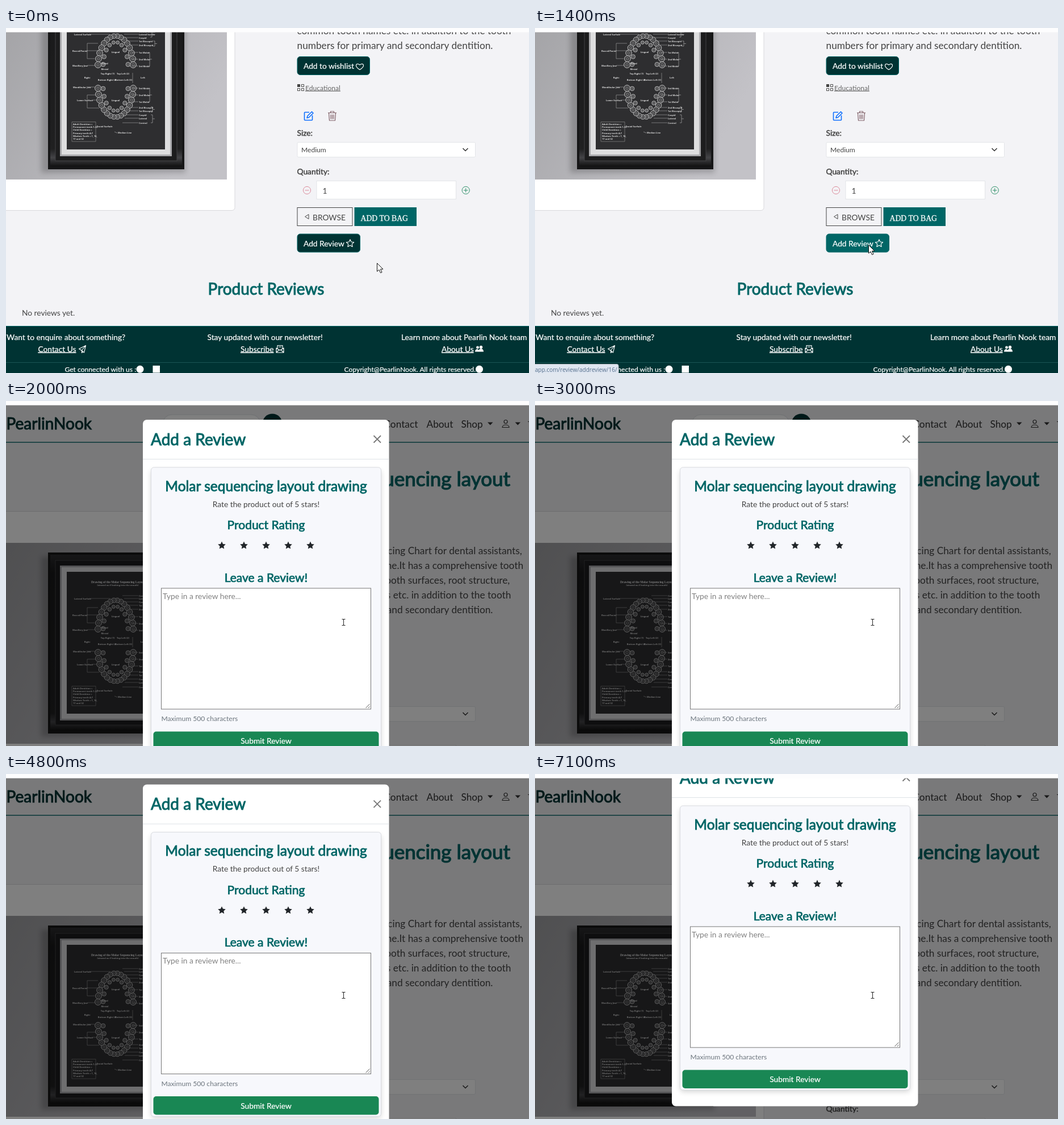
Recreate the animation shown at these times as an HTML page. Size 921 by 608 pixels, loop 7200 ms.

```html
<!DOCTYPE html>
<html lang="en">
<head>
<meta charset="utf-8">
<title>Add a review</title>
<style>
html, body { margin: 0; width: 100%; height: 100%; overflow: hidden; background: #f3f3f6; }
svg { display: block; width: 921px; height: 608px; font-family: Lato, sans-serif; }
text { white-space: pre; }
.tiny { font: bold 4px "Open Sans", sans-serif; fill: #ddd; }
</style>
</head>
<body>
<svg id="stage" viewBox="0 0 921 608"></svg>
<script>
const TEAL = '#006666', DARK = '#003333', INK = '#444', GREEN = '#198754';
const BRAND = 'PearlinNook', PRODUCT = ['Molar sequencing layout', 'drawing'];
const BASE = 13.75, SMALL = 12.1, LARGE = 17.25;
const PAGE_SCROLL = 337, LOOP = 7200, STEP = 100;

// Drawing helpers; each returns SVG markup.
const text = (x, y, size, fill, str, { heavy = 0, anchor = 'start', more = '' } = {}) =>
  `<text x="${x}" y="${y}" font-size="${size}" fill="${fill}" text-anchor="${anchor}"` +
  (heavy ? ` stroke="${fill}" stroke-width="${size * heavy}"` : '') + ` ${more}>${str}</text>`;
const rect = (x, y, w, h, fill, more = '') =>
  `<rect x="${x}" y="${y}" width="${w}" height="${h}" fill="${fill}" ${more}/>`;
const circle = (x, y, r, fill, more = '') => `<circle cx="${x}" cy="${y}" r="${r}" fill="${fill}" ${more}/>`;
const line = (d, stroke, width = 1, fill = 'none') =>
  `<path d="${d}" fill="${fill}" stroke="${stroke}" stroke-width="${width}" stroke-linejoin="round"/>`;
const MID = { anchor: 'middle' }, BOLD = { heavy: .035 }, MEDIUM = { heavy: .018 };
const LINK = { heavy: .018, more: 'text-decoration="underline"' };
const title = (y, size, str) => text(458, y, size, TEAL, str, { ...MID, ...BOLD });

function star(x, y, r) {
  const points = Array.from({ length: 10 }, (_, i) => {
    const a = i * Math.PI / 5 - Math.PI / 2, q = i % 2 ? r * .48 : r;
    return `${(x + q * Math.cos(a)).toFixed(1)} ${(y + q * Math.sin(a)).toFixed(1)}`;
  });
  return `M${points.join('L')}Z`;
}

function arch(cy, dir) {
  let out = '';
  for (const [n, rx, ry, size] of [[16, 31, 53, 5.4], [10, 22, 42, 3.7]])
    for (let i = 0; i < n; i++) {
      const a = Math.PI * (i + .2) / (n - .6), side = Math.abs(Math.cos(a));
      const x = 193 + rx * Math.cos(a), y = cy + dir * ry * Math.sin(a), r = size * (.72 + .3 * side);
      out += circle(x, y, r, '#444446', 'stroke="#d0d0d0" stroke-width=".9"') +
        circle(x, y, r * .4, 'none', 'stroke="#aaa" stroke-width=".5"');
    }
  return out;
}

function poster() {
  const label = (x, y, str, anchor = 'start') =>
    `<text class="tiny" x="${x}" y="${y}" text-anchor="${anchor}">${str}</text>`;
  let out = rect(107, 301, 173, 250, '#2e2e30') +
    `<text x="197" y="321" text-anchor="middle" font-family="Liberation Serif, serif" font-weight="bold" font-size="5.3" fill="#eee">Drawing of the Molar Sequencing Layout</text>` +
    label(197, 326, '(viewed as if looking into the mouth)', 'middle') + arch(404, -1) + arch(441, 1);
  const rightRows = [343, 348, 354, 360, 367, 380, 392, 404, 443, 455, 467, 477, 483, 490, 496, 504];
  const names = ['Central Incisor', 'Lateral Incisor', 'Cuspid', '1st Bicuspid', '2nd Bicuspid',
    '1st Molar', '2nd Molar', '3rd Molar', '3rd Molar', '2nd Molar', '1st Molar',
    '2nd Bicuspid', '1st Bicuspid', 'Cuspid', 'Lateral', 'Central'];
  rightRows.forEach((y, i) => {
    const reach = 222 - 17 * clamp((Math.abs(y - 423) - 50) / 30);
    out += line(`M${reach} ${y}H233`, '#aaa', .6) + label(234, y + 1.5, names[i]);
  });
  for (const [y, h, x] of [[343, 10, 257], [360, 9, 262], [380, 24, 253], [443, 24, 253], [476, 9, 258], [490, 14, 258]])
    out += line(`M${x - 3} ${y}h3v${h}h-3m3 ${-h / 2}h4`, '#bbb', .6);
  [[120, 348, 'Lateral Surface', 183], [117, 377, 'Buccal/Facial', 165], [117, 403, 'Maxillary Jaw', 156],
   [118, 441, 'Mandibular Jaw', 156], [125, 464, 'Lower Surface', 160], [160, 510, 'Facial Surface', 184]]
    .forEach(([x, y, str, end]) => { out += label(x, y + 1.5, str) + line(`M${x + 26} ${y}H${end}`, '#aaa', .6); });
  out += line('M143 364V391M143 364H162M143 391H156M143 455V478M143 455H158M143 478H164M223 416V434', '#aaa', .6);
  out += label(193, 381, 'Lingual', 'middle') + label(193, 466, 'Lingual', 'middle') +
    label(174, 401, 'Distal', 'middle') + label(174, 411, 'Mesial', 'middle') +
    label(179, 419, 'Top Right (1)', 'middle') + label(206, 419, 'Top Left (2)', 'middle') +
    label(178, 430, 'Bottom Right (4)', 'middle') + label(207, 430, 'Bottom Left (3)', 'middle') +
    label(143, 426, 'Right', 'middle') + label(241, 426, 'Left', 'middle') + label(197, 523, 'Median Line');
  out += line('M116 502.5H158V537H116Z', '#888', .7) + line('M191 520l5 2', '#bbb', .6);
  ['Adult Dentition =', 'Permanent teeth 1-32', 'Child Dentition =', 'Primary teeth A-T', 'Wisdom Teeth = 1, 16,', '17 and 32']
    .forEach((str, i) => { out += label(118, 508 + i * 5.2, str); });
  return out;
}

function picture() {
  return rect(-9, 194.5, 412, 464, '#fff', 'rx="5" stroke="#d9d9dc"') +
    rect(0, 250, 389, 354, 'url(#wall)') +
    rect(62, 274, 254, 318, '#000', 'opacity=".2" filter="url(#soft)"') +
    rect(74, 267, 240, 319, '#161617') +
    rect(78, 271, 232, 310, 'url(#wood)') +
    rect(87, 281, 214, 290, '#1d1d1e', 'stroke="#434345"') +
    rect(95, 290, 197, 273, '#aaaaad') +
    rect(98, 293, 191, 267, '#dededf') + poster();
}

function header() {
  const caret = x => `<path d="M${x} 37.5h9.5l-4.75 5z" fill="#333"/>`;
  return rect(0, 72, 921, 1.4, TEAL) +
    text(151, 50, 28, DARK, BRAND, { heavy: .035, anchor: 'end' }) +
    rect(276, 24, 172, 32, '#fff', 'rx="16" stroke="#dee2e6"') +
    text(287, 45, BASE, '#7c838a', 'Search Products Here') +
    circle(469, 39.8, 17.4, DARK) + circle(467.8, 39, 5, 'none', 'stroke="#fff" stroke-width="1.5"') +
    line('M471.5 43l4.5 4.5', '#fff', 1.8) +
    [[605, 'Home'], [665.5, 'Contact'], [740.5, 'About'], [801.5, 'Shop']]
      .map(([x, str]) => text(x, 46.5, LARGE, '#333', str)).join('') +
    caret(848) + caret(896.5) +
    circle(880, 36.5, 3, 'none', 'stroke="#333" stroke-width="1.2"') +
    line('M874 46.5c0-6 12-6 12 0z', '#333', 1.2) + line('M919 36l3 1', '#333');
}

function details() {
  const white = '#fff';
  const button = (y, w, str, id = '') =>
    rect(513, y, w, 32, DARK, `rx="5" stroke="${TEAL}" ${id}`) + text(524, y + 21.5, BASE, white, str, MEDIUM);
  const desc = ['Dental Molar Sequencing Chart for dental assistants,',
    'students, and everyone.It has a comprehensive tooth',
    'chart that indicates tooth surfaces, root structure,',
    'common tooth names etc. in addition to the tooth',
    'numbers for primary and secondary dentition.'];
  return PRODUCT.map((str, i) => text(512.5, 149.5 + 42 * i, 35, TEAL, str, BOLD)).join('') +
    text(512.5, 235.5, 20.6, INK, '€18.29', BOLD) +
    desc.map((str, i) => text(512.5, 270 + 26 * i, LARGE, INK, str)).join('') +
    button(387.5, 127.5, 'Add to wishlist') +
    line('M623 410.5c-11-7-6-13 0-8.5c6-4.5 11 1.5 0 8.5z', white, 1.2) +
    line('M513.5 436.5h4v4h-4z', '#444', 1.1, '#444') +
    line('M520.5 436.5h4v4h-4zM513.5 443.5h4v4h-4zM520.5 443.5h4v4h-4z', '#555', 1.1) +
    text(527, 446.5, SMALL, '#666', 'Educational', { more: 'text-decoration="underline"' }) +
    line('M534 485.5H526.5Q525.5 485.5 525.5 486.5V498.5Q525.5 499.5 526.5 499.5H538.5Q539.5 499.5 539.5 498.5V491M530 495.5l1-3.5 7.5-7.5 2.5 2.5-7.5 7.5z', '#0d6efd', 1.6) +
    line('M567 486.5H582M571.5 486v-2h6v2M568.5 487l1 13h10l1-13M572 489.5v8M574.5 489.5v8M577 489.5v8', '#806068', 1.2) +
    text(512.5, 526.5, BASE, INK, 'Size:', BOLD) +
    rect(513, 538.5, 313.5, 26, white, 'rx="2" stroke="#e3e5e8"') +
    text(520, 555.5, SMALL, INK, 'Medium') + line('M804.5 549l4.5 4.5 4.5-4.5', '#333', 1.5) +
    text(512.5, 595, BASE, INK, 'Quantity:', BOLD) +
    circle(530, 623, 6.6, 'none', 'stroke="#dc8a9a"') + line('M526.5 623h7', '#dc8a9a') +
    rect(547, 606.5, 245.5, 32, white, 'stroke="#e3e5e8"') + text(557.5, 628.5, BASE, INK, '1') +
    circle(809.7, 623, 6.6, 'none', 'stroke="#2d9068"') + line('M806 623h7.4M809.7 619.3v7.4', '#2d9068') +
    rect(513, 653.5, 97, 32, '#f3f3f6', 'stroke="#444"') + line('M533 665.5v8l-6.5-4z', INK) +
    text(540, 675.5, BASE, INK, 'BROWSE') +
    rect(613.5, 653, 109.5, 33, TEAL) +
    text(624.5, 676.5, BASE, white, 'ADD TO BAG', { heavy: .02, more: 'font-family="Liberation Serif, serif"' }) +
    button(700, 110.5, 'Add Review', 'id="review"') + line(star(606, 716.7, 7), white, 1.1);
}

function footer() {
  const w = '#fff', row = (x, y, str, style = MEDIUM, size = BASE) => text(x, y, size, w, str, style);
  return title(807, 28, 'Product Reviews') + text(28, 844, BASE, INK, 'No reviews yet.') +
    rect(0, 862.5, 921, 90, DARK) + rect(0, 862, 921, 1, TEAL) + rect(0, 926, 921, 1, '#1b5555') +
    row(1, 887, 'Want to enquire about something?') +
    row(354.5, 887, 'Stay updated with our newsletter!') +
    row(696, 887, 'Learn more about Pearlin Nook team') +
    row(56.5, 907.5, 'Contact Us', LINK) + line('M128.5 902.5l12-6-3 12.5-4-3.5zM140 897l-6.5 8v4.5l2-2', w, 1.1) +
    row(413, 907.5, 'Subscribe', LINK) + line('M476 901l6.5 4 6.5-4v8h-13zM478 901.5v-5h9v5M480 899h5M476 909l5-5M489 909l-5-5', w, 1.2) +
    row(767, 907.5, 'About Us', LINK) +
    circle(830.5, 900, 2.4, w) + circle(836.5, 899.5, 2.7, w) +
    `<path d="M826 907.5c0-6 7-6 7 0zM832 907.5c0-7 9-7 9 0z" fill="${w}"/>` +
    row(103.5, 943, 'Get connected with us :', MEDIUM, SMALL) +
    circle(236, 938.3, 6.5, w) + rect(258.5, 932, 12.5, 12.5, w) +
    row(827, 943, `Copyright@${BRAND}. All rights reserved.`, { heavy: .018, anchor: 'end' }, SMALL) +
    circle(833.5, 938.3, 6.5, w);
}

function modal() {
  return rect(241, 33, 433.5, 613.5, '#fff', 'rx="7"') +
    text(255, 77.5, 28, TEAL, 'Add a Review', BOLD) +
    line('M647.5 61l12.5 12.5M660 61l-12.5 12.5', '#777', 1.8) +
    rect(241, 102, 433.5, 1, '#dee2e6') +
    rect(255.5, 122, 405, 499, '#000', 'rx="5" opacity=".17" filter="url(#soft)"') +
    rect(255.5, 117, 405, 501, '#f7f8fc', 'rx="5" stroke="#d9dbe0"') +
    title(158.5, 24.5, PRODUCT.join(' ')) +
    text(458, 186.5, BASE, INK, 'Rate the product out of 5 stars!', MID) +
    title(226, 21, 'Product Rating') +
    [380, 419, 458, 497, 536].map(x => `<path d="${star(x, 254.8, 7.2)}" fill="#212529"/>`).join('') +
    title(318.5, 21, 'Leave a Review!') +
    rect(273.5, 330, 369, 213, '#fff', 'stroke="#767676"') +
    text(276, 348.5, BASE, '#808080', 'Type in a review here...') +
    line('M633.5 541l7-7M638 541l2.5-2.5', '#555') +
    text(273.5, 564, SMALL, '#6c757d', 'Maximum 500 characters') +
    rect(259.5, 582.5, 397, 32.5, GREEN, 'rx="5"') +
    text(458, 604, BASE, '#fff', 'Submit Review', { ...MID, ...MEDIUM });
}

const clamp = v => Math.min(1, Math.max(0, v));
const smooth = u => u * u * (3 - 2 * u);

const stage = document.getElementById('stage');
stage.innerHTML = `<defs>
  <linearGradient id="wall" x2="1" y2=".5"><stop stop-color="#a1a1a4"/><stop offset="1" stop-color="#c3c2c7"/></linearGradient>
  <linearGradient id="wood" x2="0" y2="1"><stop stop-color="#2d2d2f"/><stop offset=".1" stop-color="#19191a"/><stop offset=".9" stop-color="#202021"/><stop offset=".95" stop-color="#444447"/><stop offset="1" stop-color="#111"/></linearGradient>
  <filter id="soft"><feGaussianBlur stdDeviation="5"/></filter></defs>
  ${rect(0, 0, 921, 608, '#f3f3f6')}
  <g id="page">${header()}${picture()}${details()}${footer()}</g>
  ${rect(0, 0, 921, 608, '#000', 'id="shade"')}
  <g id="dialog">${modal()}</g>
  <g id="status">${rect(-4, 592.5, 151, 20, '#dfe6f1', 'rx="3" stroke="#b9bec6"')}${text(0, 605.5, 10, '#56708c', 'app.com/review/addreview/16/', { more: 'font-family="Open Sans, sans-serif"' })}</g>
  ${rect(0, 0, 921, 7.5, '#fdfdfe')}
  <g id="arrow">${line('M0 0V14.5L3.5 11.5 6 17 8.5 16 6 10.5H10.5Z', '#111', 1, '#fff')}</g>
  <g id="beam">${line('M591.5 384.5h2l1 1 1-1h2M594.5 385v10M591.5 395.5h2l1-1 1 1h2', '#333', 1.1)}</g>`;

const part = Object.fromEntries(['page', 'review', 'shade', 'dialog', 'status', 'arrow', 'beam']
  .map(id => [id, document.getElementById(id)]));

// Eased value at time t through [time, value] keys.
function track(keys, t) {
  let [t0, v0] = keys[0];
  for (const [t1, v1] of keys) {
    if (t < t1) return v0 + (v1 - v0) * smooth(clamp((t - t0) / (t1 - t0)));
    [t0, v0] = [t1, v1];
  }
  return v0;
}
const SCROLL = [[3000, 0], [3300, 61], [3700, 61], [3800, 60.5], [4300, 17], [4500, 17],
  [5300, 9], [5800, 9], [6100, 0], [6400, 0], [7100, 61]];

function draw(t) {
  const reloaded = t >= 1500, typing = t >= 1800;
  const x = track([[0, 653.5], [800, 587.5]], t), y = track([[0, 414.5], [800, 382.5]], t);
  const hover = x < 624 && y < 395;
  const move = (el, dx, dy) => el.setAttribute('transform', `translate(${dx} ${dy})`);
  const show = (el, on) => el.setAttribute('opacity', +on);

  move(part.page, 0, reloaded ? 0 : -PAGE_SCROLL);
  part.review.setAttribute('fill', hover && !reloaded ? TEAL : DARK);
  show(part.shade, .5 * clamp((t - 1470) / 150));
  show(part.dialog, clamp((t - 1600) / 150));
  move(part.dialog, 0, -44 * (1 - clamp((t - 1600) / 300)) ** 2 - track(SCROLL, t));
  show(part.status, hover && t < 1900);
  show(part.arrow, !typing);
  show(part.beam, typing);
  move(part.arrow, x, y);
}

const start = performance.now();
function tick() {
  const t = (performance.now() - start) % LOOP;
  draw(Math.floor(t / STEP) * STEP);
  requestAnimationFrame(tick);
}
tick();
</script>
</body>
</html>
```
